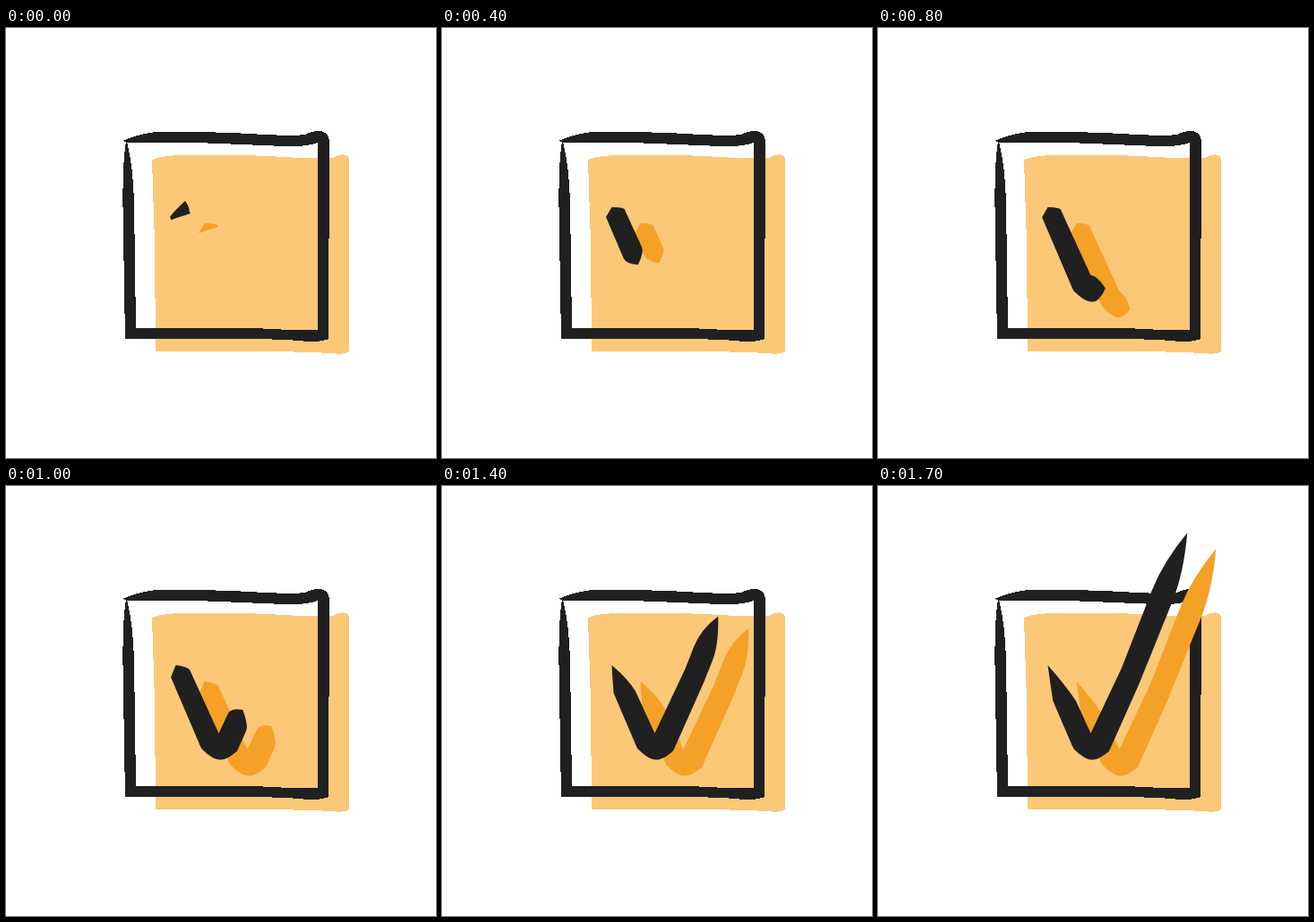
Write an HTML page that moves like this. It is 480 by 480 pixels and loops after 1.8 s.

```html
<!DOCTYPE html>
<html lang="en">
<head>
<meta charset="utf-8">
<title>Checkbox</title>
<style>
html, body { margin: 0; width: 100%; height: 100%; overflow: hidden; background: #fff; }
svg { display: block; width: 100vw; height: 100vh; }
</style>
</head>
<body>
<svg viewBox="0 0 480 480">
  <g shape-rendering="crispEdges">
    <path fill="#fbc878" d="M163 147Q175 142 200 142Q265 141 310 144Q345 146 365 145Q374 140 379 142Q383 143 383 148L383 361Q378 365 364 363Q320 361 280 361L167 361L166 240Z"/>
    <path fill="#202020" fill-rule="evenodd" d="M130 126Q152 116 178 115.5Q235 116 272 118Q318 121 334 119Q344 114 352 115Q361 118 361 128L360 347Q348 352 328 349Q300 347 262 347L133 347.5L130.5 200Q130 150 134 127Z
      M135 127Q142 155 143 194L145 334.5L270 334.5Q325 338 348 337L348 128Q335 133 310 132Q265 130 225 128.5Q180 127.5 135 128Z"/>
  </g>
  <path id="shade" fill="#f5a128" transform="translate(32 18)"/>
  <path id="tick" fill="#202020"/>
</svg>
<script>
const LOOP = 1800, STEP = 100, SAMPLES = 60;

// The two edges of the brush stroke: left arm, bend, lower and upper right arm.
const outer = [[183, 211], [218, 293], [258, 296], [291, 222], [329, 128]];
const inner = [[204.5, 204], [237.5, 276], [237.5, 276], [272, 203], [306, 116]];

// How far along the edges the brush has come at each time.
const times = [0, 200, 600, 1000, 1200, 1500, 1700];
const tickReach = [0.04, 0.31, 0.81, 2.3, 2.95, 3.45, 4];
const shadeReach = [0, 0.1, 0.51, 2.3, 3.1, 3.45, 4];

const clamp = (v, lo, hi) => Math.min(hi, Math.max(lo, v));
const mix = (a, b, k) => a.map((v, i) => v + (b[i] - v) * k);
const ahead = (p, dir, dist) => p.map((v, i) => v + dir[i] * dist);

function reachAt(reach, t) {
  let i = 0;
  while (i < times.length - 2 && t >= times[i + 1]) i++;
  const k = (t - times[i]) / (times[i + 1] - times[i]);
  return reach[i] + (reach[i + 1] - reach[i]) * k;
}

function onEdge(edge, u) {
  const i = clamp(Math.floor(u), 0, 3), k = u - i;
  const p = mix(edge[i], edge[i + 1], k);
  if (edge === outer && i === 1) p[1] += 11 * Math.sin(Math.PI * k);
  return p;
}

const middle = u => mix(onEdge(outer, u), onEdge(inner, u), 0.5);

function heading(u) {
  const a = middle(u - 0.05), b = middle(u);
  const d = [b[0] - a[0], b[1] - a[1]], len = Math.hypot(...d);
  return d.map(v => v / len);
}

function trace(edge, from, to) {
  let d = '';
  for (let i = 0; i <= SAMPLES; i++) d += 'L' + onEdge(edge, from + (to - from) * i / SAMPLES);
  return d;
}

// Both ends start blunt and become pointed as sharp goes from 0 to 1.
function stroke(t, u, start) {
  const sharp = clamp((t - 600) / 900, 0, 1) ** 3;
  const cap = 15 * Math.min(1, t / 400) + 60 * sharp ** 2;
  const dir = heading(u), tip = ahead(middle(u), dir, cap);
  const bulge = edge => ahead(onEdge(edge, u), dir, cap * 0.45);
  const from = 0.35 * sharp, back = 0.5 * sharp;
  return `M${start}Q${mix([186, 206], [192, 218], sharp)} ${onEdge(outer, from)}`
    + trace(outer, from, u)
    + `Q${bulge(outer)} ${tip}Q${bulge(inner)} ${onEdge(inner, u)}`
    + trace(inner, u, back)
    + `Q${mix([205, 200], [209, 222], sharp)} ${start}Z`;
}

const tick = document.getElementById('tick');
const shade = document.getElementById('shade');
const top0 = [200, 193], top1 = [189.5, 200];

function draw(now) {
  const t = Math.floor((now % LOOP) / STEP) * STEP;
  const start = mix(top0, top1, Math.min(1, t / 300));
  tick.setAttribute('d', stroke(t, reachAt(tickReach, t), start));
  shade.setAttribute('d', stroke(t, reachAt(shadeReach, t), top1));
}

const begin = performance.now();
function loop() {
  draw(performance.now() - begin);
  requestAnimationFrame(loop);
}
loop();
</script>
</body>
</html>
```
